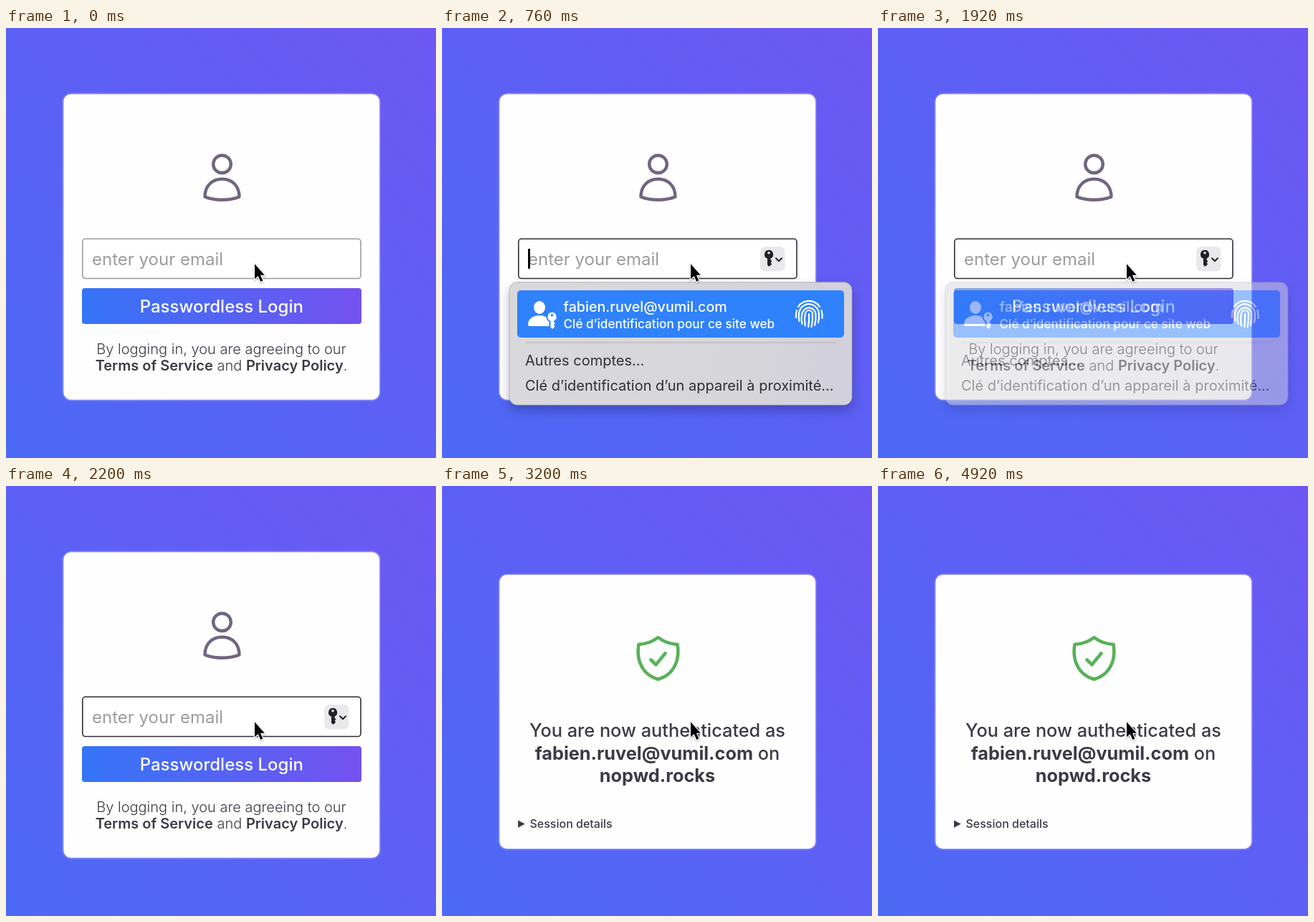
Animation of 600x600 px, one loop 4960 ms. Source, as an HTML page:

```html
<!DOCTYPE html>
<html lang="en">
<head>
<meta charset="utf-8">
<title>Passwordless login</title>
<style>
  html, body { margin: 0; width: 100%; height: 100%; overflow: hidden; }
  body { background: linear-gradient(45deg, #4c6af5, #5c60f5 50%, #6e57f3); }
  svg { display: block; width: 600px; height: 600px; }
  text { font-family: Inter, sans-serif; font-optical-sizing: none; fill: #3d3a46; }
  .mid { text-anchor: middle; }
  .line { fill: none; stroke-linecap: round; stroke-linejoin: round; }
  .card { fill: #fffeff; filter: drop-shadow(0 0 1.5px rgba(255, 255, 255, .9)); }
  .legal { font-size: 20px; font-weight: 300; }
  .legal .strong { font-weight: 570; }
  .result { font-size: 25.3px; font-weight: 450; }
  .result.strong, .result .strong { font-weight: 650; }
  .option { font-size: 20px; fill: #302f34; }
  #popup { filter: drop-shadow(0 8px 8px rgba(10, 10, 50, .28)); }
  #popup .selected { fill: #fff; font-weight: 500; }
  #pointer { stroke: #fff; stroke-width: 2.6; paint-order: stroke; filter: drop-shadow(0 1px 1px rgba(0, 0, 0, .3)); }
</style>
</head>
<body>
<svg viewBox="0 0 600 600">
  <defs>
    <linearGradient id="buttonFill" gradientUnits="userSpaceOnUse" x1="106" y1="413" x2="486" y2="363">
      <stop stop-color="#3475f7"/><stop offset="1" stop-color="#7452f0"/>
    </linearGradient>
    <linearGradient id="popupFill">
      <stop stop-color="#d9d8da"/><stop offset=".7" stop-color="#d6d5d9"/><stop offset="1" stop-color="#d2d0dc"/>
    </linearGradient>
    <path id="key" fill-rule="evenodd" d="M0-6.2A6.2 6.2 0 0 1 2.6 5.6V7.5L4.4 9.5 2.6 11.5 4.2 13.5 .6 17-2 14.5V5.8A6.2 6.2 0 0 1 0-6.2ZM0-4A1.8 1.8 0 0 0 0-.4 1.8 1.8 0 0 0 0-4Z"/>
  </defs>

  <g id="login">
    <rect class="card" x="80.5" y="92.5" width="440.5" height="426" rx="10"/>
    <g class="line" stroke="#716580" stroke-width="4.4">
      <circle cx="301.5" cy="190" r="12.3"/>
      <path d="M277.5 235.5C277.5 220 288 210.7 301.5 210.7S325.5 220 325.5 235.5Q316 239.8 301.5 239.8T277.5 235.5Z"/>
    </g>
    <rect id="field" x="106.8" y="294.3" width="388.2" height="55.2" rx="4" fill="#fff" stroke-width="1.6"/>
    <text x="120" y="331" font-size="24" style="fill:#9d9b9f">enter your email</text>
    <rect id="caret" x="120" y="308" width="3" height="28" rx="1"/>
    <g id="keyButton">
      <rect x="444" y="305" width="34.5" height="34.5" rx="7" fill="#e9e8ea"/>
      <use href="#key" x="456" y="316" fill="#222127"/>
      <path class="line" d="M466 321.2l4 4 4-4" stroke="#222127" stroke-width="2"/>
    </g>
    <rect x="106" y="363" width="390" height="50" rx="4" fill="url(#buttonFill)"/>
    <text class="mid" x="300.8" y="397" font-size="24" font-weight="500" style="fill:#fff">Passwordless Login</text>
    <text class="mid legal" x="300.5" y="455">By logging in, you are agreeing to our</text>
    <text class="mid legal" x="300.5" y="478"><tspan class="strong">Terms of Service</tspan> and <tspan class="strong">Privacy Policy</tspan>.</text>
  </g>

  <g id="popup">
    <rect x="94" y="354.8" width="478" height="171.2" rx="11" fill="url(#popupFill)" stroke="#a9a8b4" stroke-width=".8"/>
    <rect x="105" y="366" width="456" height="66" rx="5" fill="#2f82fb"/>
    <g fill="#fff">
      <ellipse cx="136" cy="390" rx="8" ry="9"/>
      <path d="M120 413.5C120 406 127 401 136 401S151 406 151 413.5Q151 416 148.5 416H122.5Q120 416 120 413.5Z"/>
      <use href="#key" x="153.5" y="403" stroke="#2f82fb" stroke-width="4"/>
      <use href="#key" x="153.5" y="403"/>
    </g>
    <text class="selected" x="169.5" y="396" font-size="19.7">fabien.ruvel@vumil.com</text>
    <text class="selected" x="169.5" y="419.3" font-size="17.2">Clé d’identification pour ce site web</text>
    <path class="line" stroke="#fff" stroke-width="2.2" d="M497 389A18 18 0 0 1 527 389M494 404Q493.6 399 495 394M529.5 394Q531 399 530.5 405
      M498.5 409Q496.5 399 500 392A14 14 0 0 1 526 399Q526.5 406 525 411
      M502.5 413Q500.5 403 503 397A9.5 9.5 0 0 1 521.5 399Q522 408 520 415
      M507 415.5Q505 405 507 399A5 5 0 0 1 517 399Q517.5 409 515.5 417M512 399Q512.5 409 511.2 417"/>
    <path d="M116.5 439H550" stroke="#bcbbbf" stroke-width="1.5"/>
    <text class="option" x="116" y="471.3">Autres comptes…</text>
    <text class="option" x="116" y="506">Clé d’identification d’un appareil à proximité…</text>
  </g>

  <g id="welcome">
    <rect class="card" x="80.5" y="124" width="440.5" height="382" rx="10"/>
    <g class="line" stroke="#58b159" stroke-width="4.6">
      <path d="M301.5 211.3Q290 220.5 274.5 221C270.5 245 281 264 301.5 269.8C322 264 332.5 245 328.5 221Q313 220.5 301.5 211.3Z"/>
      <path d="M291.5 242.5L298.5 249.3 311.5 233.5"/>
    </g>
    <text class="mid result" x="300.5" y="350">You are now authenticated as</text>
    <text class="mid result" x="300.5" y="381.5"><tspan class="strong">fabien.ruvel@vumil.com</tspan> on</text>
    <text class="mid result strong" x="300.5" y="413">nopwd.rocks</text>
    <path d="M106 466.5L115.8 471.5 106 476.8Z" fill="#3d3a46"/>
    <text x="122.5" y="477.3" font-size="16" font-weight="450">Session details</text>
  </g>

  <path id="pointer" d="M347 329.3V350.3L351.7 346 355.3 354 358.4 352.6 354.9 344.8H360.8Z"/>
</svg>
<script>
  const LOOP = 4960, FOCUS = 400, POPUP_IN = 440, POPUP_OUT = 1840, FADE = 160, SIGNED_IN = 3120, BLINK = 500;
  const [login, welcome, popup, field, caret, keyButton] =
    ['login', 'welcome', 'popup', 'field', 'caret', 'keyButton'].map(id => document.getElementById(id));
  const show = (el, on) => el.style.display = on ? '' : 'none';

  function draw() {
    const t = performance.now() % LOOP;
    const focused = t >= FOCUS;
    const popupAlpha = t < POPUP_IN ? 0 : Math.min(1, Math.max(0, 1 - (t - POPUP_OUT) / FADE));

    show(login, t < SIGNED_IN);
    show(welcome, t >= SIGNED_IN);
    show(keyButton, focused);
    show(caret, focused && (t - FOCUS) % (2 * BLINK) < BLINK);
    show(popup, popupAlpha > 0);
    popup.style.opacity = popupAlpha;
    field.setAttribute('stroke', focused ? '#302d37' : '#9b99a0');
    requestAnimationFrame(draw);
  }
  draw();
</script>
</body>
</html>
```
